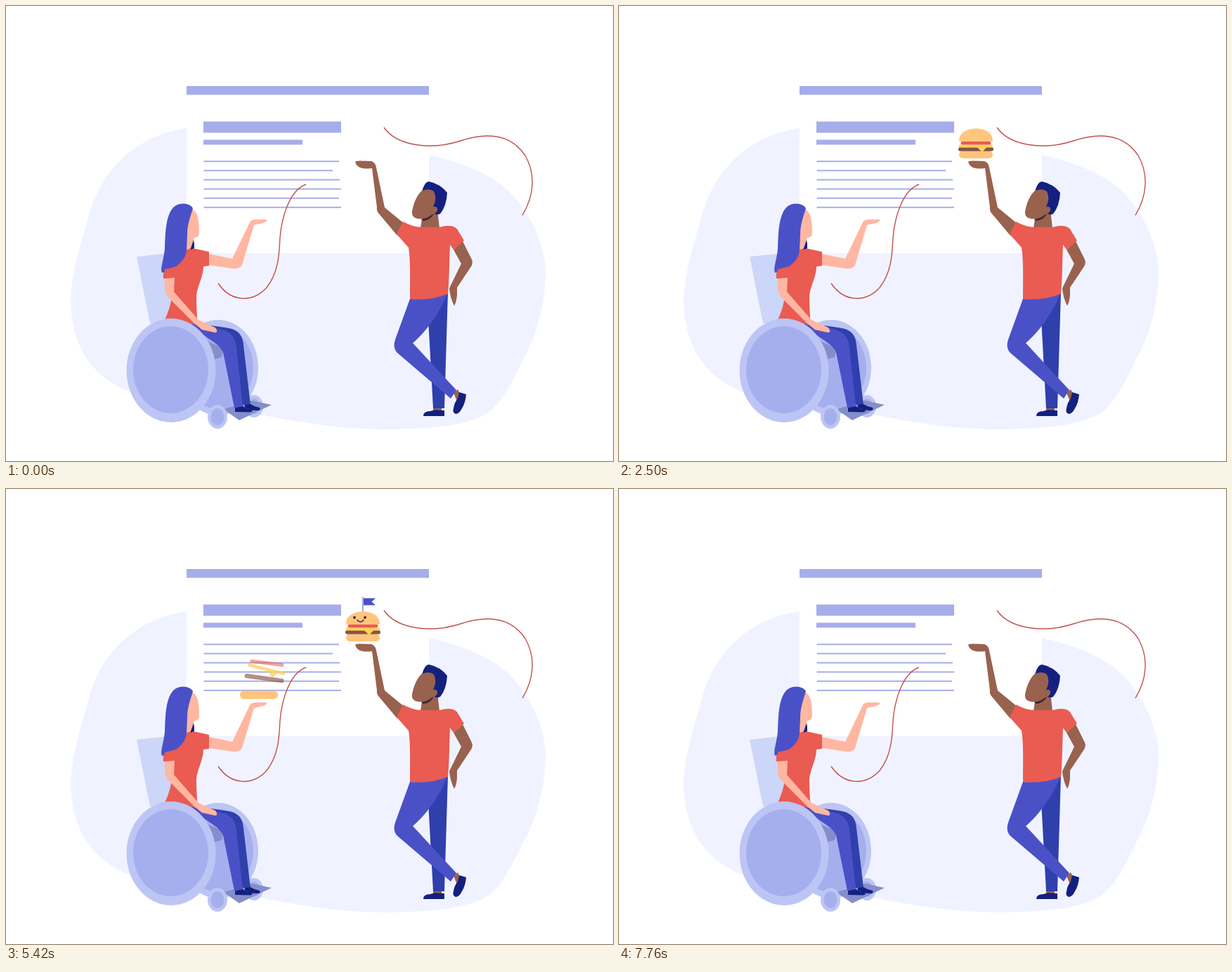
Write an HTML page that moves like this. It is 864 px wide and 648 px high and loops after 7780 ms.

```html
<!DOCTYPE html>
<html lang="en">
<head>
<meta charset="utf-8">
<title>Building burgers</title>
<style>
  html, body { margin: 0; width: 100%; height: 100%; overflow: hidden; background: #fff; }
  svg { display: block; width: 864px; height: 648px; }
  .part { transform-box: fill-box; transform-origin: center; }
  .pale { fill: #bcc5f4; }
  .lilac { fill: #a6afee; }
  .blue { fill: #4a51c7; }
  .deep { fill: #2f3fac; }
  .navy { fill: #14207f; }
  .red { fill: #ea5b52; }
  .peach { fill: #ffb7a2; }
  .brown { fill: #98624f; }
  .wire { fill: none; stroke: #c2514e; stroke-width: 1.4; }
</style>
</head>
<body>
<svg viewBox="0 0 864 648">
  <path fill="#f0f3ff" d="M257 174C195 182 136 225 117 302C103 350 92 390 92 420C93 490 128 530 172 548C230 570 300 570 372 584C425 594 480 603 545 603C615 602 668 596 693 574C716 550 727 520 743 490C760 455 768 415 768 375C765 330 741 288 715 263C687 237 646 222 602 212L500 180Z"/>
  <path fill="#fff" d="M257 114H602V352H257Z"/>
  <g id="page" fill="#a6adea">
    <path d="M257 114H602V126.500H257ZM281 164.500H477V180.500H281ZM281 190.500H422V197.500H281Z"/>
  </g>

  <g id="woman">
    <path fill="#ccd6f8" d="M186 357L232 352L245 447L205 452Z"/>
    <ellipse class="pale" cx="302" cy="515" rx="57" ry="68"/>
    <ellipse class="lilac" cx="302" cy="515" rx="50" ry="59"/>
    <path fill="#858ecb" d="M280 474L310 488L307 500L296 503Z"/>
    <ellipse class="pale" cx="353" cy="570" rx="13" ry="16"/>
    <ellipse class="lilac" cx="353" cy="570" rx="8" ry="11"/>
    <path fill="#858ecb" d="M309 574L332 590L378 568L350 562Z"/>
    <path class="deep" d="M285 454L318 459C332 462 337 470 338 483L348 568H337L312 480Z"/>
    <path class="navy" d="M340 568L348 567Q354 571 361 572Q363 576 358 576L350 575.500L340 572Z"/>
    <path class="blue" d="M262 452L299 459C321 463 326 471 328 486L337 570L325 572L309 493C302 478 280 472 262 452Z"/>
    <path class="navy" d="M326 572L337 570Q343 574 350 574.500Q352 578 347 578.500L326 578Z"/>
    <path class="red" d="M258 345L266 345L289 350V370L281 371C281 385 273 397 271 412Q271 435 273 454L226 447C235 428 238 410 237 388L224 388Q222 372 238 360Z"/>
    <path class="navy" d="M261 326Q269 330 268 345L263 347Z"/>
    <path class="peach" d="M264 289C274 293 275 307 275 323Q275 330 268 330L263 345L255 348L252 320Z"/>
    <path class="blue" d="M266 288C261 280 246 279 238 287C226 300 227 330 226 345C225 360 219 374 222 380C240 374 255 365 257 348L258 326C258 310 263 299 266 288Z"/>
    <path class="peach" d="M289 353L322 360L347 308Q349 304 356 304L370 304Q374 306 366 309L353 312L336 369Q333 375 323 374L289 369Z"/>
    <path class="red" d="M226 375L242 371L241 388H224Z"/>
    <ellipse class="pale" cx="235" cy="519" rx="63.500" ry="74"/>
    <ellipse class="lilac" cx="234.500" cy="518" rx="53.500" ry="62"/>
    <path class="peach" d="M226 388L240 387L239 407L274 447Q285 452 298 458Q303 465 297 465L279 461L268 452L230 414Q225 408 226 388Z"/>
    <ellipse class="pale" cx="301" cy="585" rx="14" ry="17"/>
    <ellipse class="lilac" cx="301" cy="585" rx="9.500" ry="12"/>
  </g>

  <g id="man">
    <path class="brown" d="M608 568H620V579H608ZM637 551L643 546L648 556L642 563Z"/>
    <path class="deep" d="M629 408L624 573H608L601 445Z"/>
    <path class="navy" d="M594 584Q594 577 604 577L611 575L624 576V584Z"/>
    <path class="blue" d="M575 417Q604 419 629 408C617 438 598 464 579 480L641 547L633 559L557 494Q550 487 554 475Z"/>
    <path class="navy" d="M645 550L655 553Q654 565 649 573Q645 581 640 581Q635 579 637 573Q638 565 643 559Z"/>
    <path class="brown" d="M637 347L650 335L663 361Q665 366 662 371L642 401L642 412Q641 422 638 427Q632 415 631 402L648 367Z"/>
    <path class="brown" d="M497 222Q498 220 505 220.500L520 221Q526 223 527 230L539 287L567 310L557 327L531 296Q527 292 528 287L521 231Q500 234 497 222Z"/>
    <path class="brown" d="M592 303L614 290L617 316Q603 320 590 316Z"/>
    <path fill="#40292f" d="M591 304L609 296Q604 305 594 306Z"/>
    <path class="navy" d="M592 264Q596 250 602 250Q618 253 628 266Q627 285 618 296Q612 299 608 294Z"/>
    <path class="brown" d="M592 263Q603 259 609 264Q614 274 608 286Q615 285 614 291Q612 296 606 297Q599 304 588 303Q577 302 578 293C580 281 585 269 592 263Z"/>
    <path class="red" d="M565 307Q577 314 591 315H617Q639 309 644 321L652 334L637 347L632 340C631 365 631 390 629 410Q605 420 575 417C575 390 576 362 573 344L556 325Z"/>
  </g>

  <g id="burgers"></g>
  <path class="wire" d="M302 395C321 423 352 422 371 401C388 380 389 352 390 330C392 305 402 263 427 254"/>
  <path class="wire" d="M538 173C556 199 604 206 647 192C690 178 721 186 739 213C754 239 752 270 735 298"/>
</svg>
<script>
const LOOP = 7780, FALL = 600, DIP = 300;
const NS = 'http://www.w3.org/2000/svg';
const clamp = v => Math.min(1, Math.max(0, v));

function add(parent, tag, attrs) {
  const el = document.createElementNS(NS, tag);
  for (const key in attrs) el.setAttribute(key, attrs[key]);
  return parent.appendChild(el);
}

[474, 465, 475, 477, 474, 477].forEach((end, i) =>
  add(page, 'rect', { x: 281.5, y: 220.3 + i * 13.1, width: end - 281.5, height: 2 }));

// Shapes stand on the centre of the burger's base; x, y and turn say where each one falls from.
const parts = [
  { stage: 'base', x: 74, y: -45, turn: 12,
    shape: '<rect x="-24" y="-10.200" width="48" height="10.200" rx="5" fill="#ffc57d"/>' },
  { stage: 'filling', wait: 40, x: 25, y: -49, turn: 14,
    shape: '<rect x="-25" y="-15.700" width="50" height="5.500" rx="2.700" fill="#8b5344"/>' },
  { stage: 'filling', x: 40, y: -90, turn: 28,
    shape: '<path d="M-23.500 -19.500H23.500Q25 -15.500 22 -15.500H15L9 -9L2 -15.500H-23Q-25 -17 -23.500 -19.500Z" fill="#ffd157"/>' },
  { stage: 'filling', wait: 80, x: 32, y: -74, turn: 11,
    shape: '<rect x="-21.500" y="-24" width="43" height="4.500" rx="2.200" class="red"/>' },
  { stage: 'flag', x: -68, y: -160, turn: 95, dip: 3,
    shape: '<rect x="-1.200" y="-63.500" width="2.200" height="22.500" fill="#a6adea"/>' },
  { stage: 'bun', x: -74, y: -72, turn: 171,
    shape: '<path d="M-24 -26C-23 -48 23 -48 24 -26Q24 -24 22 -24H-22Q-24 -24 -24 -26Z" fill="#ffc57d"/>' },
  { stage: 'flag', x: -10, y: -160, turn: -136, dip: 3,
    shape: '<path d="M1 -61.500H18L12.500 -56.500L18 -51.500H1Z" class="blue"/>' },
  { stage: 'face', x: 0, y: 4, turn: 0, shrink: .5,
    shape: '<g fill="#3b2630"><circle cx="-12" cy="-34" r="1.900"/><circle cx="3" cy="-34" r="1.900"/></g>' +
      '<path d="M-8 -30.500Q-3.500 -24.500 1 -30.500" fill="none" stroke="#3b2630" stroke-width="1.400" stroke-linecap="round"/>' }
];

function makeBurger(x, y, scale, reach, starts) {
  const group = add(burgers, 'g', { transform: `translate(${x} ${y}) scale(${scale})` });
  const pieces = parts.map(part => {
    const el = add(group, 'g', { class: 'part' });
    el.innerHTML = part.shape;
    return { ...part, el, reach, start: starts[part.stage] + (part.wait || 0) };
  });
  return { group, pieces };
}

const pair = [
  makeBurger(508, 217, 1, 1, { base: 480, filling: 1160, bun: 1800, flag: 2650, face: 3240 }),
  makeBurger(360, 299, 1.13, .63, { base: 4330, filling: 5120, bun: 6110, flag: 6320, face: 6800 })
];

function drop({ el, start, x, y, turn, reach, dip = 0, shrink = 0 }, time) {
  const p = clamp((time - start) / FALL);
  const far = reach * (1 - p) ** 1.5;
  const sink = dip * Math.sin(Math.PI * clamp((time - start - FALL) / DIP));
  el.style.opacity = clamp(1.5 * p);
  el.style.transform = `translate(${x * far}px, ${y * far + sink}px) ` +
    `rotate(${turn * (1 - p)}deg) scale(${1 - shrink * (1 - p)})`;
}

function draw(now) {
  const time = now % LOOP;
  for (const { group, pieces } of pair) {
    group.style.opacity = clamp((7740 - time) / 400);
    pieces.forEach(piece => drop(piece, time));
  }
  requestAnimationFrame(() => draw(performance.now()));
}
draw(performance.now());
</script>
</body>
</html>
```
